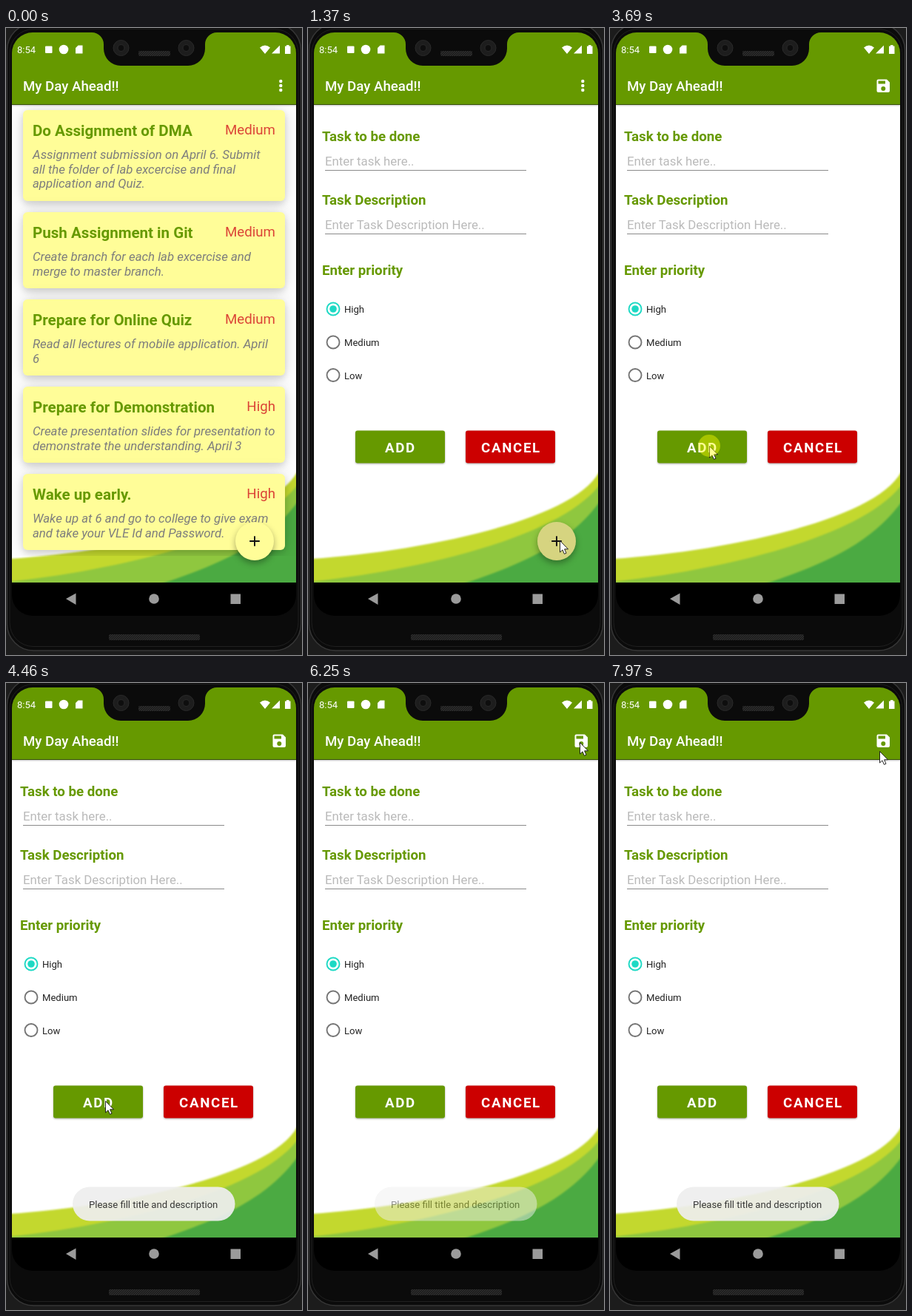
An HTML page that plays this animation: 400x848 px, repeating every 8000 ms.

```html
<!DOCTYPE html>
<html lang="en">
<head>
<meta charset="utf-8">
<title>Task list</title>
<style>
html, body { margin: 0; height: 100%; overflow: hidden; background: #0b0b0b; }
svg { display: block; width: 400px; height: 848px; font-family: Roboto, sans-serif; }
.title { font: bold 20.55px Roboto, sans-serif; fill: #690; }
.level { font-size: 18.68px; fill: #db4437; text-anchor: end; }
.note { font: italic 16.81px Roboto, sans-serif; fill: #7d7d7d; }
.label { font: bold 18.68px Roboto, sans-serif; fill: #690; }
.hint { font-size: 16.81px; fill: #bababa; }
.small { font-size: 13.08px; fill: #222; }
.button { font: bold 18.68px Roboto, sans-serif; letter-spacing: 1.67px; fill: #fff; }
.card { fill: #fffd98; filter: drop-shadow(0 4px 5px #0002) drop-shadow(0 1px 11px #0002); }
.raised { filter: drop-shadow(0 1px 1px #0005); }
.white { fill: #fff; }
</style>
</head>
<body>
<svg viewBox="0 0 400 848">
  <defs>
    <clipPath id="screen"><rect x="8" y="6" width="384" height="789" rx="28"/></clipPath>
    <clipPath id="listArea"><rect x="8" y="104" width="384" height="610"/></clipPath>
    <clipPath id="addArea"><rect x="64" y="544" width="121" height="45" rx="3"/></clipPath>
    <pattern id="mesh" width="3" height="3" patternUnits="userSpaceOnUse">
      <rect width="3" height="3" fill="#2c2c2c"/><path d="M0 3L3 0" stroke="#151515"/>
    </pattern>
  </defs>

  <!-- Phone body -->
  <rect width="400" height="848" fill="#1c1c1c"/>
  <rect x="1.5" y="-6" width="397" height="848" rx="36" fill="#0b0b0b" stroke="#363636" stroke-width="1.5"/>
  <rect x="5" y="1.5" width="390" height="835" rx="32" fill="#0b0b0b" stroke="#202020"/>
  <rect x="139" y="820" width="123" height="8" rx="2" fill="url(#mesh)"/>

  <g clip-path="url(#screen)">
    <rect x="8" y="104" width="384" height="646" fill="#fff"/>
    <g style="filter:blur(1.1px)">
      <path d="M4 718C155 708 372 664 396 594V756H4Z" fill="#c3d82e"/>
      <path d="M4 749C160 732 347 686 396 615V756H4Z" fill="#8fc73f"/>
      <path d="M196 756C280 729 352 701 396 638V756Z" fill="#4baa42"/>
    </g>

    <g id="list" clip-path="url(#listArea)"></g>

    <g id="form">
      <text class="label" x="19" y="153">Task to be done</text>
      <text class="hint" x="23" y="186">Enter task here..</text>
      <text class="label" x="19" y="239">Task Description</text>
      <text class="hint" x="23" y="271.5">Enter Task Description Here..</text>
      <path d="M23 192.5H295M23 278.5H295" stroke="#8a8a8a"/>
      <text class="label" x="19" y="334">Enter priority</text>
      <g fill="none" stroke="#757575" stroke-width="1.9">
        <circle cx="34" cy="380" r="8.5" stroke="#1dd9c4"/>
        <circle cx="34" cy="425" r="8.5"/>
        <circle cx="34" cy="469.5" r="8.5"/>
      </g>
      <circle cx="34" cy="380" r="4.8" fill="#1dd9c4"/>
      <text class="small" x="49" y="385">High</text>
      <text class="small" x="49" y="430">Medium</text>
      <text class="small" x="49" y="474.5">Low</text>
      <rect class="raised" x="64" y="544.5" width="121" height="44" rx="3" fill="#690"/>
      <rect class="raised" x="213" y="544.5" width="121" height="44" rx="3" fill="#c00"/>
      <text class="button" x="104" y="574">ADD</text>
      <text class="button" x="234" y="574">CANCEL</text>
      <circle id="addRipple" cx="134" cy="565" fill="#fff" clip-path="url(#addArea)"/>
    </g>

    <g id="fab">
      <circle cx="336" cy="694" r="26" fill="#fffd98" style="filter:drop-shadow(0 4px 4px #0005)"/>
      <circle id="fabPress" cx="336" cy="694" r="26" opacity=".16"/>
      <path d="M329.2 694H342.8M336 687.2V700.8" stroke="#111" stroke-width="1.9"/>
    </g>

    <!-- App bar and status bar -->
    <rect x="8" y="0" width="384" height="103.5" fill="#690" style="filter:drop-shadow(0 1px 1px #0005)"/>
    <text class="white" x="23" y="85" font-size="18.68" font-weight="500">My Day Ahead!!</text>
    <g class="white">
      <text x="15" y="34" font-size="13">8:54</text>
      <rect x="53" y="24.5" width="9.5" height="9.5" rx="1"/>
      <circle cx="78" cy="29" r="6.3"/>
      <path d="M97.5 23.5H103.5V34.5H94V27ZM343 26.5Q350 20.5 357 26.5L350 35ZM359 34.5L370 23.5V34.5Z"/>
      <path d="M377 24.5H379V23H382.5V24.5H384.5V35H377Z"/>
      <g id="dots"><circle cx="371.3" cy="72" r="2.2"/><circle cx="371.3" cy="78" r="2.2"/><circle cx="371.3" cy="84" r="2.2"/></g>
      <g id="save">
        <path fill-rule="evenodd" d="M362.5 69.5H374L378 73.5V85Q378 87 376 87H362.5Q360.5 87 360.5 85V71.5Q360.5 69.5 362.5 69.5ZM362.5 71.5V75.5H372V71.5ZM366.3 82A3 3 0 1 0 372.3 82A3 3 0 1 0 366.3 82Z"/>
        <circle id="saveRipple" cx="369.5" cy="78"/>
      </g>
    </g>

    <!-- Navigation bar -->
    <rect x="8" y="750" width="384" height="45"/>
    <path d="M81 772L94.5 764.5V780Z" fill="#9b9b9b"/>
    <circle cx="200" cy="772" r="6.8" fill="#9b9b9b"/>
    <rect x="303.5" y="765.5" width="13.5" height="13.5" fill="#9b9b9b"/>

    <g id="toast">
      <rect x="90" y="681.5" width="219.5" height="46" rx="23" fill="#eee" opacity=".93"/>
      <text class="small" x="112" y="710" fill-opacity=".9">Please fill title and description</text>
    </g>
  </g>

  <!-- Notch -->
  <path d="M116 5V6A16 16 0 0 1 132 22V28A23 23 0 0 0 155 51H246A23 23 0 0 0 269 28V22A16 16 0 0 1 285 6V5Z" fill="#0b0b0b"/>
  <rect x="179" y="31" width="43" height="7" rx="2" fill="url(#mesh)"/>
  <g fill="#1d1d1d" stroke="#2a2a2a">
    <circle cx="155.5" cy="27" r="10.5"/><circle cx="243.5" cy="27" r="10.5"/>
    <circle cx="155.5" cy="27" r="4.5" fill="#0e0e0e"/><circle cx="243.5" cy="27" r="4.5" fill="#0e0e0e"/>
  </g>

  <g id="mouse">
    <path d="M.5 .5V16L4 12.8L6.4 18.3L9 17.2L6.6 11.8H11.5Z" fill="#fff" stroke="#111" stroke-width=".9"/>
    <circle id="click" r="15" fill="#ff0" opacity=".42"/>
  </g>
</svg>
<script>
const $ = id => document.getElementById(id);

const cards = [
  [111, 123, "Do Assignment of DMA", "Medium", "Assignment submission on April 6. Submit", "all the folder of lab excercise and final", "application and Quiz."],
  [249, 103, "Push Assignment in Git", "Medium", "Create branch for each lab excercise and", "merge to master branch."],
  [367, 103, "Prepare for Online Quiz", "Medium", "Read all lectures of mobile application. April", "6"],
  [485, 103, "Prepare for Demonstration", "High", "Create presentation slides for presentation to", "demonstrate the understanding. April 3"],
  [603, 103, "Wake up early.", "High", "Wake up at 6 and go to college to give exam", "and take your VLE Id and Password."]
];
$("list").innerHTML = cards.map(([y, h, title, level, ...lines]) =>
  `<rect class="card" x="23" y="${y}" width="354" height="${h}" rx="6"/>
   <text class="title" x="36" y="${y + 35}">${title}</text>
   <text class="level" x="364" y="${y + 33}">${level}</text>` +
  lines.map((line, i) => `<text class="note" x="36" y="${y + 66 + i * 19.6}">${line}</text>`).join("")
).join("");

const LOOP = 8000;
const within = (t, from, to) => t >= from && t < to;
const show = (id, on) => $(id).style.display = on ? "" : "none";
const ease = p => p * p * (3 - 2 * p);

// Screen-recorder progress: n held steps, the first at `from`, the last at `to`
function steps(t, from, to, n) {
  const k = Math.floor((t - from) / (to - from) * (n - 1) + 1.001);
  return Math.min(n, Math.max(0, k)) / n;
}

// Quadratic curve through a control point
const curve = (a, c, b, p) => a.map((v, i) =>
  (1 - p) ** 2 * v + 2 * p * (1 - p) * c[i] + p * p * b[i]);

function mouseAt(t) {
  if (t < 1910) return curve([378, 862], [372, 730], [340, 693], ease(steps(t, 230, 820, 9)));
  if (t < 2760) return curve([340, 693], [196, 264], [134, 562], ease(steps(t, 1910, 2680, 11)));
  if (t < 5240) return [134, 562 + 3 * steps(t, 2760, 2840, 2)];
  if (t < 7970) return curve([134, 565], [230, 260], [367, 80], ease(steps(t, 5240, 6020, 11)));
  return [364, 92];
}

function ripple(id, p, radius, alpha) {
  $(id).setAttribute("r", radius * Math.min(1, p * 4));
  $(id).setAttribute("opacity", alpha * Math.min(1, 2 * (1 - p)));
}

function draw(t) {
  const onForm = t >= 1290;
  show("list", !onForm);
  show("form", onForm);
  show("fab", t < 1450);
  show("fabPress", t >= 1220);
  show("dots", t < 1450);
  show("save", t >= 1450);

  const [x, y] = mouseAt(t);
  $("mouse").setAttribute("transform", `translate(${x} ${y})`);
  show("mouse", t >= 230);
  show("click", within(t, 1050, 1220) || within(t, 3690, 3920) || within(t, 6880, 7110));

  const addPress = steps(t, 3920, 4460, 8);
  const savePress = steps(t, 7110, 7660, 8);
  ripple("addRipple", addPress, 75, .25);
  ripple("saveRipple", savePress, 18.5, .22);

  const fade = t < 6090 ? ease(addPress)
    : t < 7110 ? 1 - steps(t, 6090, 6400, 5) ** 1.5
    : ease(savePress);
  $("toast").setAttribute("opacity", fade);
}

function tick() {
  draw(performance.now() % LOOP);
  requestAnimationFrame(tick);
}
tick();
</script>
</body>
</html>
```
